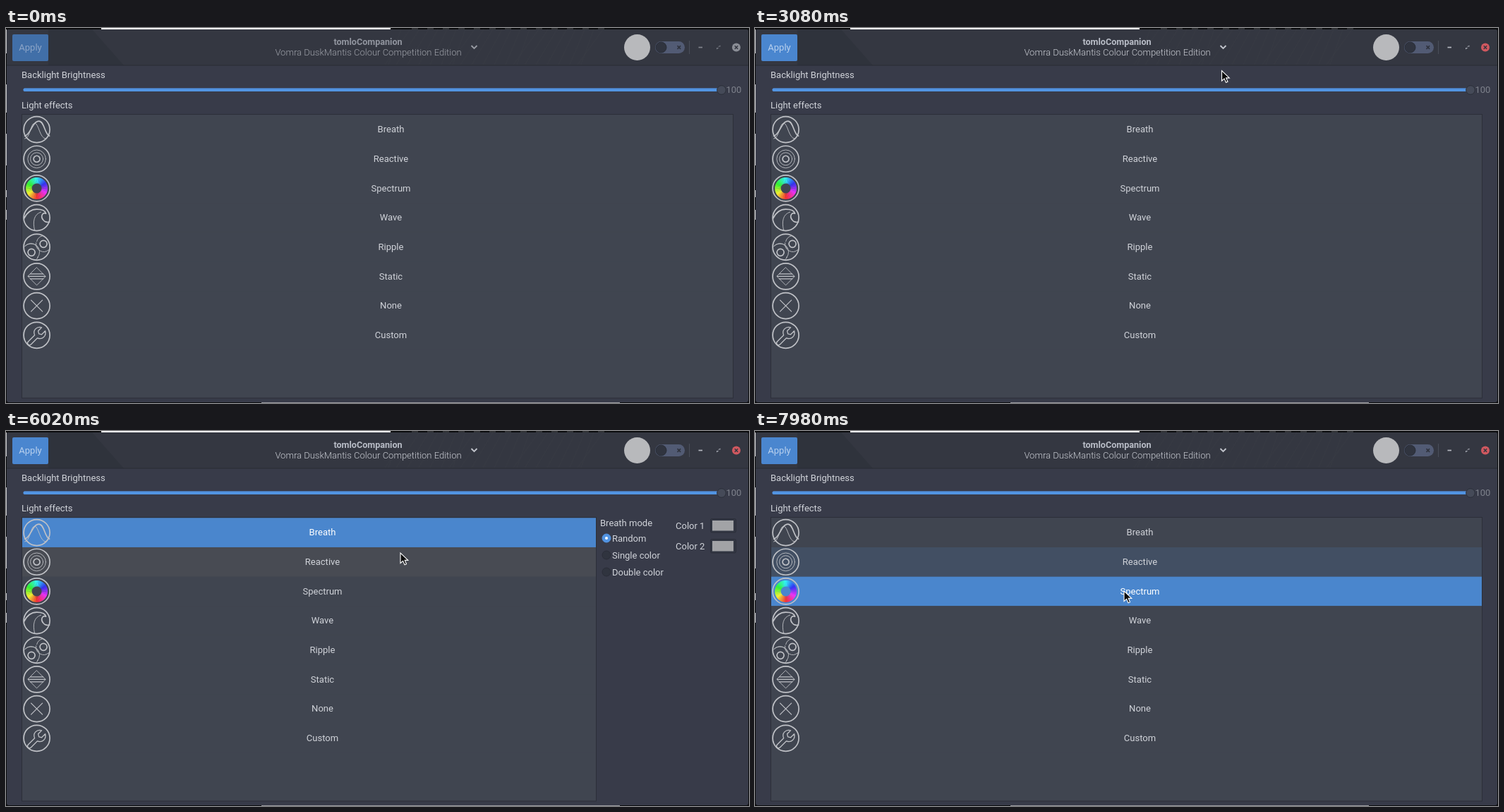
Animation, 1053 px wide and 532 px high, one loop 8 s. Source, as an HTML page:

```html
<!DOCTYPE html>
<html lang="en">
<head>
<meta charset="utf-8">
<title>Keyboard light settings</title>
<style>
  html, body { margin: 0; width: 100%; height: 100%; overflow: hidden; background: #0b0c0e; }
  svg { display: block; width: 100%; height: 100%; font: 13px Roboto, sans-serif; }
  text { fill: #d0d3d9; }
  .mid { text-anchor: middle; }
  .icon { fill: none; stroke: #bfc1c6; stroke-width: 1.7; stroke-linecap: round; stroke-linejoin: round; }
  .thin { stroke-width: .9; }
</style>
</head>
<body>
<svg id="stage" viewBox="0 0 1053 532"></svg>
<script>
const LOOP = 8000, STEP = 70;
const PRODUCT = 'Vomra DuskMantis Colour Competition Edition';
const BLUE = '#5294e2', ROW = 41.67, LIST_TOP = 123.3;
const EFFECTS = ['Breath', 'Reactive', 'Spectrum', 'Wave', 'Ripple', 'Static', 'None', 'Custom'];

// time, x, y of the pointer tip
const PATH = [
  [70, 760, 330], [840, 521, 39], [1190, 521, 39], [1610, 955, 27], [1820, 955, 27],
  [1890, 957, 27], [2100, 957, 27], [2310, 948, 27], [2870, 948, 27], [3290, 375, 94],
  [3710, 640, 94], [3850, 647, 91], [4060, 519, 91], [4550, 988, 92], [4620, 1010, 92],
  [4760, 1010, 92], [5180, 960, 126], [5460, 932, 143], [5740, 932, 143], [6020, 559, 173],
  [6230, 532, 222], [6580, 529, 168], [6650, 530, 167], [6790, 530, 167], [7000, 531, 176],
  [7210, 531, 176], [7700, 523, 227], [8000, 523, 227]
];

const clamp = v => Math.max(0, Math.min(1, v));
const ramp = (t, from, to) => clamp((t - from) / (to - from));
const rect = (x, y, w, h, fill, more = '') =>
  `<rect x="${x}" y="${y}" width="${w}" height="${h}" fill="${fill}" ${more}/>`;
const text = (x, y, s, more = '') => `<text x="${x}" y="${y}" ${more}>${s}</text>`;
const circle = (x, y, r, more = '') => `<circle cx="${x}" cy="${y}" r="${r}" ${more}/>`;
const path = (d, more = '') => `<path d="${d}" ${more}/>`;
const mix = (a, b, k) => `rgb(${a.map((v, i) => Math.round(v + (b[i] - v) * k))})`;

function colourWheel() {
  const n = 48, at = (a, r) => `${(r * Math.cos(a)).toFixed(2)} ${(r * Math.sin(a)).toFixed(2)}`;
  let out = '';
  for (let i = 0; i < n; i++) {
    const a = Math.PI / 2 + i * 2 * Math.PI / n, b = a + 2.3 * Math.PI / n;
    out += path(`M${at(a, 7)}L${at(a, 15.5)}L${at(b, 15.5)}L${at(b, 7)}Z`,
      `fill="hsl(${i * 360 / n + 5},92%,58%)" stroke="none"`);
  }
  return out;
}

// icon artwork, centred on 0,0
const ICONS = [
  path('M-17 9C-9 8-6-12 3-12C11-12 11 7 18 9') +
    path('M-17 13C-9 12-9-9-3-9C3-9 4 13 13 13', 'class="thin"'),
  circle(0, 0, 4.5) + circle(0, 0, 9, 'class="thin"') + circle(0, 0, 12.8, 'class="thin"'),
  colourWheel(),
  path('M-18 1C-13-9-7-12 0-12C7-12 12-10 13-6C8-8 5-2 9 3C11 6 15 7 18 6') +
    path('M-3 18C-6 5-4-5 6-8', 'class="thin"'),
  circle(-7.5, 7.5, 5) + circle(9.5, -4.5, 5) +
    path('M-17-1A11 11 0 0 1 1 15M-16-2A11 11 0 0 1 2 2M2 14A11 11 0 0 1-1 18M0-8A11 11 0 0 1 8-16M-1-6A11 11 0 0 0 17 4', 'class="thin"'),
  path('M0-12.5L12.5 0L0 12.5L-12.5 0Z', 'class="thin"') +
    path('M-9-3.5H9M-12 0H12M-9 3.5H9', 'stroke-width="1.3"'),
  path('M-8-8L8 8M8-8L-8 8', 'stroke-width="1.2"'),
  path('M-12 9L-3 0C-6-7 0-13 7-11L2-6L3-2L7-1L12-6C14 1 8 7 1 4L-8 13C-11 16-15 12-12 9Z', 'stroke-width="1.3"')
];

function swatch(y, fill) {
  return rect(998.5, y, 36, 19.5, '#333743', 'rx="2" stroke="#2b2e39"') +
    rect(1001, y + 2.5, 30, 14.5, fill);
}

function radio(y, label, on) {
  return circle(851, y, 6, `fill="${on ? BLUE : '#30343f'}" stroke="${on ? BLUE : '#2a2d38'}"`) +
    (on ? circle(851, y, 2, 'fill="#fff"') : '') + text(859, y + 4.5, label);
}

function backdrop() {
  let out = rect(0, 0, 1053, 532, '#0b0c0e') + rect(135, 0, 410, 2, '#f1f1f1') +
    rect(362, 531, 508, 1, '#9b9ca0');
  for (const [y, h] of [[2, 34], [80, 40], [150, 45], [230, 10], [258, 14]])
    out += rect(0, y, 1, h, '#c9c9cb');
  for (let x = 575; x < 850; x += 22) out += path(`M${x} 1h9`, 'stroke="#55565a"');
  return out;
}

function header() {
  let lines = '';
  for (let x = 560; x < 850; x += 13)
    lines += path(`M${x} 2l-${18 + x % 7 * 3} 50`, 'stroke="#3a3d46" stroke-width="2" opacity=".35"');
  return path('M1 53V5q0-3 3-3H1049q3 0 3 3V53Z', 'fill="#343741"') +
    path('M60 2H122L167 53H60Z', 'fill="#2f323b" opacity=".8"') + lines +
    rect(1, 52.5, 1051, 1, '#292c35') +
    rect(9, 9, 51, 38, BLUE, 'rx="2" id="apply"') +
    text(34.5, 32, 'Apply', 'class="mid" id="applyText"') +
    `<g id="titles">` +
    text(513, 24, 'tomloCompanion', 'class="mid" style="font-weight:700;font-size:12.6px;fill:#b9bdc7"') +
    text(513.5, 39, PRODUCT, 'class="mid" style="font-weight:300;fill:#c9ccd3"') +
    path('M659.5 25L663.5 29L667.5 25', 'fill="none" stroke="#c3c6cd" stroke-width="1.8"') + `</g>` +
    circle(894.5, 27.5, 18.5, 'id="badge"') +
    rect(920, 19, 42, 17, '#525b74', 'rx="8.5" id="track"') +
    circle(928.5, 27.5, 7.5, 'fill="#30343f" stroke="#282c36" id="knob"') +
    path('M951.5 25.2l4.6 4.6m0-4.6l-4.6 4.6', 'id="cross" stroke="#30343f" stroke-width="1.7"') +
    path('M924.5 27.5l2.6 2.7l5-5.2', 'id="check" fill="none" stroke="#2b3445" stroke-width="2.2"') +
    path('M968.5 18V37', 'stroke="#4a4e59"') +
    `<g id="controls">` + path('M981.5 27.5h5.5', 'stroke="#b5b8c0" stroke-width="1.7"') +
    path('M1008.5 26.5h4v-2zM1010.5 28h-3.5v2.5z', 'fill="#a0a4ad"') + `</g>` +
    circle(1035, 27.5, 6, 'id="close"') +
    path('M1032.8 25.3l4.4 4.4m0-4.4l-4.4 4.4', 'stroke="#343741" stroke-width="1.5"');
}

function rows() {
  return EFFECTS.map((name, i) => {
    const y = LIST_TOP + ROW * i, mid = y + 20.8;
    return rect(23, y, 1007, ROW, '#4a86cd', `id="row${i}"`) +
      `<g class="icon" transform="translate(43.6 ${mid})">` + ICONS[i] + circle(0, 0, 18.5) + '</g>' +
      text(0, mid + 4.2, name, `class="mid" id="name${i}"`);
  }).join('');
}

document.getElementById('stage').innerHTML = backdrop() +
  rect(1, 2, 1051, 529, '#383b49', 'rx="3"') + header() +
  text(22, 71, 'Backlight Brightness') + text(22, 114, 'Light effects') +
  rect(24.5, 85.5, 994, 4.5, '#46618f', 'rx="2"') + rect(24.5, 85.5, 994, 4.5, BLUE, 'rx="2" id="fill"') +
  circle(1014, 88, 6.3, 'id="handle" stroke="#2a2e38"') +
  text(1020.5, 92, '100', 'id="value" style="fill:#7e828c"') +
  rect(22.5, 122.5, 1008, 402.5, '#404550', 'id="list" stroke="#2c2f39"') + rows() +
  `<g id="breath">` + text(842, 134.5, 'Breath mode') + radio(152, 'Random', true) +
  radio(176, 'Single color') + radio(200, 'Double color') +
  text(949, 138.5, 'Color 1') + swatch(124.5, '#a2a3a6') +
  text(949, 167.5, 'Color 2') + swatch(153.5, '#a2a3a6') + `</g>` +
  `<g id="reactive">` + text(871, 138.5, 'Key lit time') +
  rect(941, 122.5, 94, 23, '#404550', 'rx="2" stroke="#2f323d"') +
  path('M981.5 123V145M1008.5 123V145', 'stroke="#393d49"') + text(947.5, 138.5, '1') +
  path('M990 134h9', 'stroke="#7d818b" stroke-width="1.4"') +
  path('M1017 134h9m-4.5-4.5v9', 'stroke="#e4e6ea" stroke-width="1.7"') +
  text(871, 167.5, 'Color') + swatch(153.5, '#fff') + `</g>` +
  `<g id="popover">` + rect(382, 62, 290, 57, '#000', 'rx="6" opacity=".12"') +
  path('M388 61.5H518L527 53L536 61.5H666q3 0 3 3V111q0 3-3 3H388q-3 0-3-3V64.5q0-3 3-3Z', 'fill="#353844" stroke="#22252e"') +
  rect(391, 68, 271.5, 39, BLUE) + text(527, 92, PRODUCT, 'class="mid" style="fill:#fff"') + `</g>` +
  path('M0 0V14.5L3.6 11.3L6 16.8L8.5 15.7L6.2 10.4H10.8Z', 'id="pointer" fill="#0b0b0b" stroke="#fff" stroke-width="1.1"');

const el = {};
document.querySelectorAll('[id]').forEach(e => el[e.id] = e);
const set = (id, attrs) => { for (const k in attrs) el[id].setAttribute(k, attrs[k]); };
const show = (id, on) => set(id, { visibility: on ? 'visible' : 'hidden' });

function pointerAt(t) {
  let i = 0;
  while (i < PATH.length - 2 && PATH[i + 1][0] <= t) i++;
  const [t0, x0, y0] = PATH[i], [t1, x1, y1] = PATH[i + 1];
  const u = ramp(t, t0, t1), k = u * u * (3 - 2 * u);
  return [x0 + (x1 - x0) * k, y0 + (y1 - y0) * k];
}

// strength of a row's selection colour
function selection(t, from, to) {
  if (t < from) return 0;
  return t < to ? 1 : Math.max(0, .55 - .4 * (t - to) / STEP);
}

function draw(t) {
  const focus = ramp(t, 0, 280);
  set('apply', { fill: mix([65, 111, 168], [74, 134, 207], focus) });
  el.applyText.style.fill = mix([140, 165, 199], [184, 208, 238], focus);
  set('titles', { opacity: .7 + .3 * focus });
  set('controls', { opacity: .6 + .4 * focus });
  set('close', { fill: mix([139, 142, 150], [208, 88, 95], focus) });

  const [x, y] = pointerAt(t);
  set('pointer', { transform: `translate(${x.toFixed(1)} ${y.toFixed(1)})` });
  show('pointer', t >= 140);
  set('popover', { opacity: t < 1050 ? 0 : 1 - ramp(t, 1190, 1400) });

  const on = t >= 2100 && t < 2660;
  set('track', { fill: on ? BLUE : '#525b74' });
  set('knob', { cx: on ? 953.5 : 928.5 });
  show('check', on);
  show('cross', !on);
  set('badge', { fill: mix([184, 185, 188], [216, 217, 219], on ? ramp(t, 2100, 2310) : 0) });

  const drag = t >= 3780 && t < 4620;
  const knobX = drag ? Math.min(1014, x + 2) : 1014;
  set('handle', { cx: knobX, fill: drag ? '#4a5468' : '#454a58' });
  set('fill', { width: drag ? knobX - 24.5 : 994 });
  el.value.textContent = Math.round((knobX - 27.5) / 9.865);

  const breath = t >= 5600 && t < 7140, reactive = t >= 7140 && t < 7910;
  show('breath', breath);
  show('reactive', reactive);
  const right = breath ? 836.5 : reactive ? 865.5 : 1030.5;
  set('list', { width: right - 22.5 });

  const picked = [selection(t, 5600, 7140), selection(t, 7140, 7910), selection(t, 7910, LOOP)];
  const hovered = t > 4760 && x < right ? Math.floor((y - LIST_TOP) / ROW) : -1;
  EFFECTS.forEach((_, i) => {
    const p = picked[i] || 0, base = i === hovered ? [72, 75, 83] : [64, 69, 80];
    set('row' + i, { width: right - 23.5, fill: mix(base, [74, 134, 205], p) });
    set('name' + i, { x: (right + 60.5) / 2 });
    el['name' + i].style.fill = p === 1 ? '#fff' : '#d0d3d9';
  });
}

const start = performance.now();
function tick() {
  const t = (performance.now() - start) % LOOP;
  draw(Math.floor(t / STEP) * STEP);
  requestAnimationFrame(tick);
}
tick();
</script>
</body>
</html>
```
